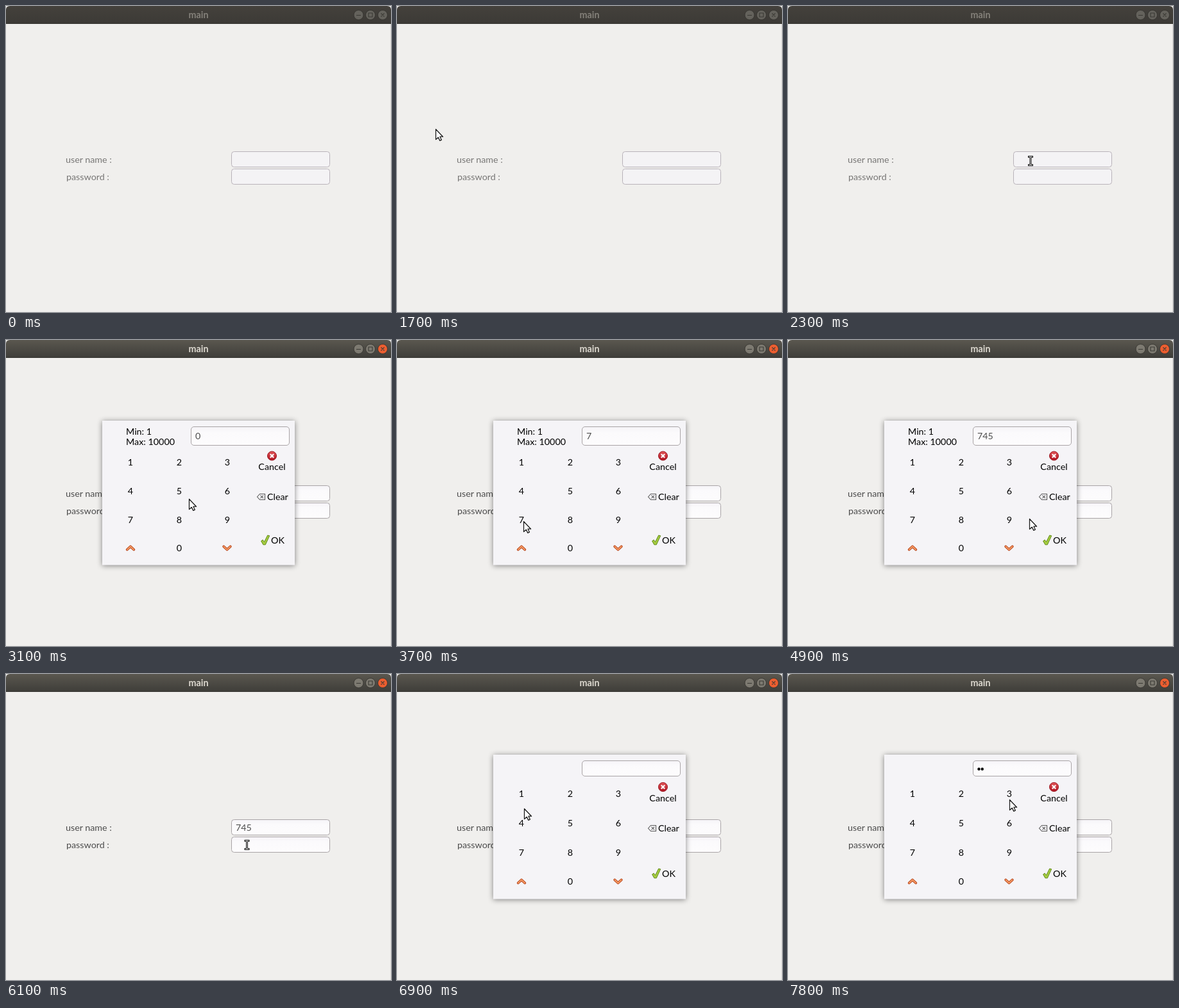
An HTML page for the animation above (8000 ms loop, 600x478 px).

```html
<!DOCTYPE html>
<html lang="en">
<head>
<meta charset="utf-8">
<title>main</title>
<style>
  html, body { margin: 0; width: 100%; height: 100%; overflow: hidden; background: #f0efed; }
  svg { display: block; width: 600px; height: 478px; font: 14.3px Lato, "Open Sans", sans-serif; }
  .mid { text-anchor: middle; }
  .title { font-weight: bold; fill: #dfdbd2; }
  .label, .value { fill: #4c4c4c; }
  .field { fill: url(#entry); stroke: #a9a4a6; }
  .knob { fill: #7d7a71; stroke: #33322e; stroke-width: .8; }
  .close { fill: #ec5e30; }
  .sign { fill: none; stroke: #3a3934; stroke-width: 1.1; }
  .bar { fill: url(#bar); }
  .blur .title { fill: #85827b; }
  .blur .label { fill: #777675; }
  .blur .field { fill: #f4f3f5; stroke: #b9b3ba; }
  .blur .knob { fill: #64625c; }
  .blur .bar { fill: url(#dimBar); }
  .panel { fill: #f5f4f7; filter: drop-shadow(0 1px 4px #0007); }
</style>
</head>
<body>
<svg viewBox="0 0 600 478">
  <defs>
    <linearGradient id="bar" x2="0" y2="1">
      <stop stop-color="#5a574f"/><stop offset="1" stop-color="#3e3d39"/>
    </linearGradient>
    <linearGradient id="dimBar" x2="0" y2="1">
      <stop stop-color="#44413c"/><stop offset="1" stop-color="#3c3a36"/>
    </linearGradient>
    <linearGradient id="entry" x2="0" y2="1">
      <stop stop-color="#f5f3f7"/><stop offset=".3" stop-color="#fbfafc"/><stop offset="1" stop-color="#fdfcfd"/>
    </linearGradient>
    <linearGradient id="red" x2="0" y2="1">
      <stop stop-color="#e2585a"/><stop offset="1" stop-color="#b01220"/>
    </linearGradient>
  </defs>

  <g id="win">
    <rect width="600" height="478" fill="#f0efed"/>
    <path d="M599.5 28V478" stroke="#dedcda"/>
    <path class="bar" d="M0 28V6Q0 0 6 0H594Q600 0 600 6V28Z"/>
    <path d="M0 27.5H600" stroke="#34332f"/>
    <text class="title mid" x="300" y="19">main</text>
    <circle class="knob" cx="549.5" cy="14" r="7.5"/>
    <circle class="knob" cx="568" cy="14" r="7.5"/>
    <circle class="knob close" cx="587" cy="14" r="7.5"/>
    <path class="sign" d="M546 14.5h7M565 11h6v6h-6zM584.5 11.5l5 5m0 -5l-5 5"/>
    <text class="label" x="93" y="245">user name :</text>
    <text class="label" x="94" y="272">password :</text>
    <rect class="field" x="351.5" y="227.5" width="153" height="24" rx="4"/>
    <rect class="field" x="351.5" y="254.5" width="153" height="24" rx="4"/>
    <text class="value" id="user" x="358" y="245"></text>
  </g>

  <g id="number"></g>
  <g id="secret"></g>

  <path id="arrow" d="M.5 .5V16.6L4.3 13.2L6.8 18.4L9.4 17.2L7 12.2H11.6Z"
        fill="#fff" stroke="#1c1c1c" stroke-width="1.3" stroke-linejoin="round"/>
  <g id="beam" fill="none" stroke-linecap="square">
    <path d="M-2.5 -6.5H2.5M0 -6.5V6.5M-2.5 6.5H2.5" stroke="#161616" stroke-width="3"/>
    <path d="M-2.5 -6.5H2.5M0 -6.5V6.5M-2.5 6.5H2.5" stroke="#eee" stroke-width=".9"/>
  </g>
</svg>

<script>
const $ = id => document.getElementById(id);
const LOOP = 8000, STEP = 100;

const text = (s, x, y, cls = '') => `<text class="${cls}" x="${x}" y="${y}">${s}</text>`;

function chevron(x, y, dir) {
  const d = `M${x - 5.2} ${y + 2.4 * dir}L${x} ${y - 2.4 * dir}L${x + 5.2} ${y + 2.4 * dir}`;
  const line = (color, w) => `<path d="${d}" fill="none" stroke="${color}" stroke-width="${w}"
    stroke-linecap="round" stroke-linejoin="round"/>`;
  return line('#b5431c', 4) + line('#f59a62', 2);
}

// Keypad markup: y centres of the four rows and of the side buttons
function keypad(rows, fieldHeight, cancel, clear, ok) {
  const cols = [194, 270, 345];
  let s = '<rect class="panel" x="150" y="126" width="300" height="225.5"/>' +
    `<rect class="field" x="288.5" y="135.5" width="153" height="${fieldHeight}" rx="4.5"/>`;
  for (let i = 0; i < 9; i++) s += text(i + 1, cols[i % 3], rows[i / 3 | 0] + 5, 'mid');
  s += text(0, 270, rows[3] + 5, 'mid') + chevron(194, rows[3], 1) + chevron(344.5, rows[3], -1);
  s += `<circle cx="414.5" cy="${cancel}" r="7" fill="url(#red)" stroke="#9c1520"/>
    <path d="M411.8 ${cancel - 2.7}l5.4 5.4m0 -5.4l-5.4 5.4" stroke="#fff" stroke-width="2.2"/>`;
  s += text('Cancel', 414.5, cancel + 22, 'mid') + text('Clear', 407, clear + 5) + text('OK', 413, ok + 5);
  s += `<path d="M391.5 ${clear}l4 -4.5h8v9h-8zm5 -2.3l4.6 4.6m0 -4.6l-4.6 4.6"
    fill="none" stroke="#5c5c5c" stroke-width="1.1"/>`;
  s += `<path d="M397.6 ${ok + 1}l2.6 -1.8l2.3 3.2l5.2 -10.4l3 .8l-6.4 14h-3.4z"
    fill="#a5cc3f" stroke="#618a1c" stroke-linejoin="round"/>`;
  return s;
}

$('number').innerHTML = keypad([191, 236, 281, 325], 29, 181, 245, 313) +
  text('Min: 1', 187, 147.5) + text('Max: 10000', 187, 163.5) +
  '<text class="value" id="amount" x="295" y="155"></text>';
$('secret').innerHTML = keypad([187, 233, 279, 324], 24, 176.5, 241, 312) +
  '<circle id="dot1" cx="297.5" cy="148.5" r="2.2"/><circle id="dot2" cx="302.8" cy="148.5" r="2.2"/>';

// Pointer stops: time, x, y
const path = [
  [1700, 60, 192], [2000, 275, 226], [2300, 378, 242], [2800, 378, 242],
  [3100, 285, 248], [3400, 197, 283], [3800, 197, 283], [4200, 200, 243],
  [4400, 200, 243], [4600, 274, 244], [4700, 274, 244], [4900, 376, 279],
  [5200, 426, 309], [5400, 426, 309], [5900, 375.5, 267], [6400, 375.5, 267],
  [6900, 198, 210], [7000, 198, 210], [7200, 272, 195], [7500, 272, 195], [7800, 345, 196]
];

const clamp = v => Math.min(1, Math.max(0, v));
const ease = v => v * v * (3 - 2 * v);

function pointer(t) {
  const i = path.findIndex(p => p[0] > t);
  if (i < 0) return path[path.length - 1].slice(1);
  const [a, b] = [path[Math.max(0, i - 1)], path[i]];
  const k = ease(clamp((t - a[0]) / (b[0] - a[0] || 1)));
  return [a[1] + (b[1] - a[1]) * k, a[2] + (b[2] - a[2]) * k];
}

const show = (id, on) => $(id).setAttribute('visibility', on ? 'visible' : 'hidden');

// Dialogs unfold vertically around the window centre
function unfold(id, t, open, close) {
  const k = ease(clamp((t - open) / 200)) * (1 - ease(clamp((t - close) / 200)));
  $(id).style.display = k > 0 ? '' : 'none';
  $(id).setAttribute('transform', `translate(0 239) scale(1 ${k}) translate(0 -239)`);
  return k > 0;
}

function draw(time) {
  const t = Math.floor(time % LOOP / STEP) * STEP;
  $('win').setAttribute('class', t < 2600 ? 'blur' : '');
  $('user').textContent = t < 5300 ? '' : '745';
  $('amount').textContent = t < 3500 ? '0' : '745'.slice(0, 1 + (t >= 4100) + (t >= 4600));
  show('dot1', t >= 7000);
  show('dot2', t >= 7500);

  const first = unfold('number', t, 2600, 5300);
  const second = unfold('secret', t, 6200, LOOP);
  const [x, y] = pointer(t);
  const beam = !first && !second && x > 351 && y > 227 && y < 279;
  for (const id of ['arrow', 'beam']) {
    $(id).style.display = t >= 1700 && beam === (id === 'beam') ? '' : 'none';
    $(id).setAttribute('transform', `translate(${x} ${y})`);
  }
}

const start = performance.now();
function tick() {
  draw(performance.now() - start);
  requestAnimationFrame(tick);
}
tick();
</script>
</body>
</html>
```
